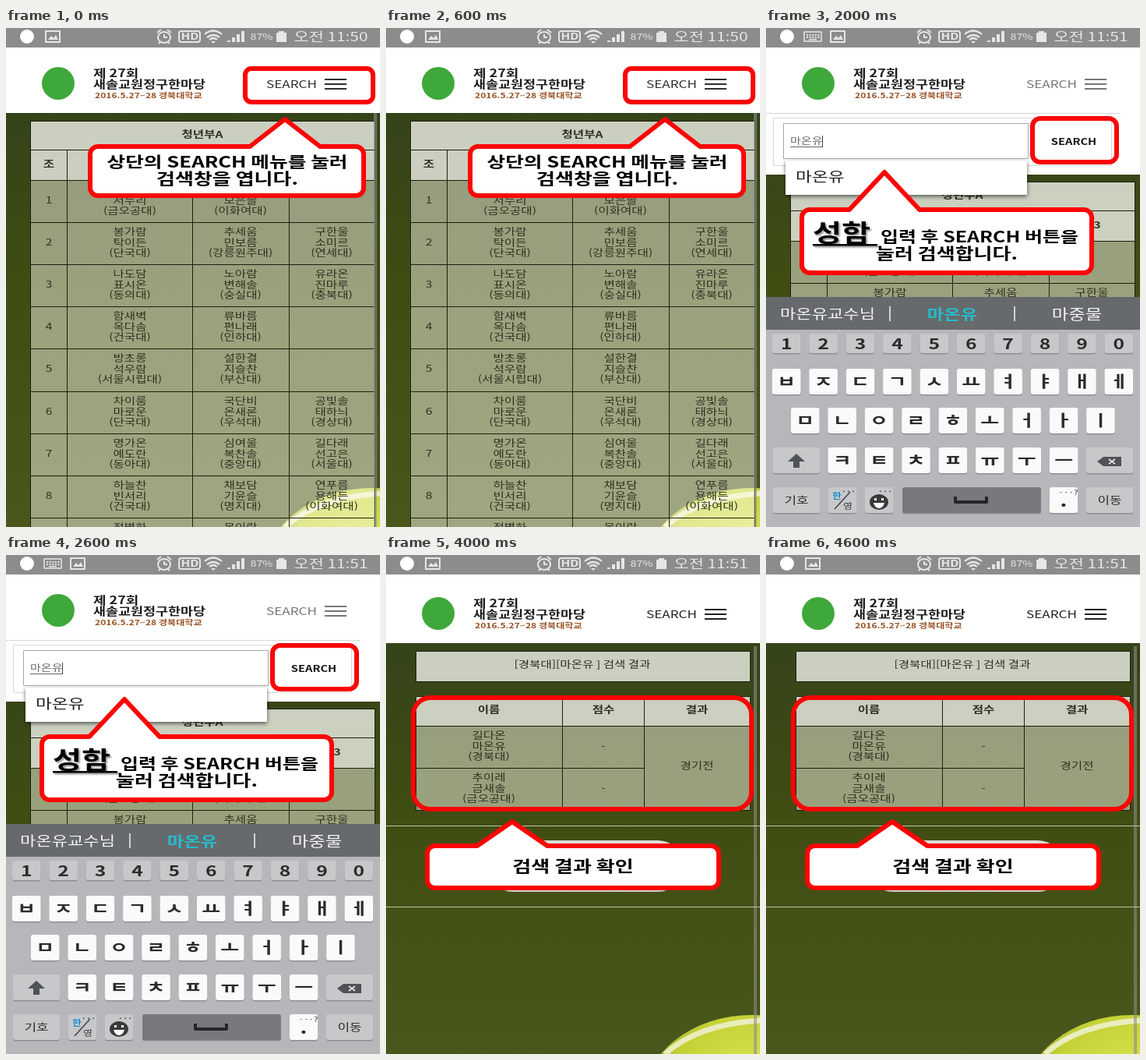
An HTML page with a canvas that plays this animation: 480 px wide and 640 px high, repeating every 5000 ms.

```html
<!DOCTYPE html>
<html lang="ko">
<head>
<meta charset="utf-8">
<style>
html, body { margin: 0; width: 100%; height: 100%; overflow: hidden; background: #3c4a14; }
canvas { display: block; }
</style>
</head>
<body>
<canvas id="stage" width="480" height="640"></canvas>
<script>
const c = document.getElementById('stage').getContext('2d');
const FONT = '"Noto Sans CJK KR", "Noto Sans CJK", "Noto Sans", sans-serif';
const WIDE = 1.3; // the phone screen is shown wider than it is
const RED = '#fa0505', INK = '#2d3020', PALE = '#e6e6e6';
const CELL = 'rgba(255,255,242,.47)', HEAD = 'rgba(255,255,250,.74)';
const PERSON = '마온유';

// Each row: two players and a school per team
const teams = [
  ['도하람 서누리 (금오공대)', '주다온 모은솔 (이화여대)'],
  ['봉가람 탁이든 (단국대)', '추세움 민보름 (강릉원주대)', '구한울 소미르 (연세대)'],
  ['나도담 표시온 (동의대)', '노아람 변해솔 (숭실대)', '유라온 진마루 (충북대)'],
  ['함새벽 옥다솜 (건국대)', '류바름 편나래 (인하대)'],
  ['방초롱 석우람 (서울시립대)', '설한결 지슬찬 (부산대)'],
  ['차이룸 마로운 (단국대)', '국단비 온새론 (우석대)', '공빛솔 태하늬 (경상대)'],
  ['명가온 예도란 (동아대)', '심여울 복찬솔 (중앙대)', '길다래 선고은 (서울대)'],
  ['하늘찬 빈서리 (건국대)', '채보담 기윤슬 (명지대)', '연푸름 용해든 (이화여대)'],
  ['전별하', '목이랑']
];

function text(s, x, y, size = 12, color = INK, weight = 400, align = 'center') {
  c.save();
  c.translate(x, y + size * .37);
  c.scale(WIDE, 1);
  c.font = `${weight} ${size}px ${FONT}`;
  c.fillStyle = color;
  c.textAlign = align;
  c.fillText(s, 0, 0);
  c.restore();
}
const left = (s, x, y, size, color, weight) => text(s, x, y, size, color, weight, 'left');
const bold = (s, x, y, size = 20) => text(s, x, y, size, '#000', 700);

function fill(x, y, w, h, color) {
  c.fillStyle = color;
  c.fillRect(x, y, w, h);
}

function round(x, y, w, h, r, { color, line, width = 6 }) {
  c.beginPath();
  c.roundRect(x, y, w, h, r);
  paint(color, line, width);
}

function paint(color, line, width) {
  if (color) { c.fillStyle = color; c.fill(); }
  if (line) { c.strokeStyle = line; c.lineWidth = width; c.lineJoin = 'round'; c.stroke(); }
}

function path(d, color, line, width = 2) {
  const p = new Path2D(d);
  if (color) { c.fillStyle = color; c.fill(p); }
  if (line) { c.strokeStyle = line; c.lineWidth = width; c.stroke(p); }
}

function callout(x, y, w, h, tipX, tipY) {
  const r = 10, right = x + w, bottom = y + h;
  c.beginPath();
  c.moveTo(tipX - 45, y);
  c.lineTo(tipX, tipY);
  c.lineTo(tipX + 45, y);
  c.arcTo(right, y, right, bottom, r);
  c.arcTo(right, bottom, x, bottom, r);
  c.arcTo(x, bottom, x, y, r);
  c.arcTo(x, y, right, y, r);
  c.closePath();
  paint('#fff', RED, 6);
}

function shadowWord(s, x, y, lineW) {
  c.save();
  c.shadowColor = '#999';
  c.shadowOffsetX = c.shadowOffsetY = 2;
  c.shadowBlur = 2;
  left(s, x, y, 31, '#000', 700);
  fill(x, y + 14, lineW, 2.5, '#000');
  c.restore();
}

function field(ball) {
  const g = c.createLinearGradient(0, 109, 0, 640);
  g.addColorStop(0, '#35431a');
  g.addColorStop(.4, '#3f4d13');
  g.addColorStop(1, '#49571c');
  fill(0, 0, 480, 640, g);
  if (!ball) return;
  const b = c.createRadialGradient(470, 690, 40, 470, 700, 140);
  b.addColorStop(0, '#d5e04a');
  b.addColorStop(.7, '#c4d136');
  b.addColorStop(1, '#a3b428');
  c.beginPath();
  c.ellipse(470, 700, 140, 110, 0, 0, 7);
  paint(b);
  path('M358 640Q400 602 480 597', null, '#e9edbd', 7);
}

// Borders sit on whole pixels so that they stay sharp
function cell(x, y, w, h, color) {
  fill(x, y, w, h, color);
  c.strokeStyle = '#1b200f';
  c.lineWidth = 1;
  c.strokeRect(x + .5, y + .5, w, h);
}

function lines(s, x, y) {
  s.split(' ').forEach((part, i) => text(part, x, y + 13.3 * i));
}

function teamTable(top) {
  const cols = [31, 78, 239, 363, 473], mids = [55, 159, 301, 418];
  cell(31, top, 442, 37, HEAD);
  text('청년부A', 252, top + 18, 12, INK, 700);
  ['조', '팀1', '팀2', '팀3'].forEach((s, i) => {
    cell(cols[i], top + 37, cols[i + 1] - cols[i], 39, HEAD);
    text(s, mids[i], top + 56, 12, INK, 700);
  });
  const rowTop = n => top + 76 + Math.round(54.1 * n);
  teams.forEach((row, n) => {
    const y = rowTop(n);
    for (let i = 0; i < 4; i++) {
      cell(cols[i], y, cols[i + 1] - cols[i], rowTop(n + 1) - y, CELL);
      if (!i) text(n + 1, mids[0], y + 26);
      else if (row[i - 1]) lines(row[i - 1], mids[i], y + 13);
    }
  });
}

function pictureIcon(x) {
  c.strokeStyle = PALE;
  c.lineWidth = 2;
  c.strokeRect(x - 9, 4, 18, 14);
  path(`M${x - 6} 15l4-5 3 3 3-4 3 6z`, PALE);
}

function statusBar(time, typing) {
  fill(0, 0, 480, 25, '#8c8c8c');
  if (!time) return;
  c.beginPath();
  c.arc(27, 11, 9, 0, 7);
  paint('#fff');
  pictureIcon(typing ? 92 : 60);
  if (typing) {
    c.strokeStyle = PALE;
    c.lineWidth = 1.5;
    c.strokeRect(49, 5, 22, 12);
    for (let i = 0; i < 10; i++) fill(52 + i % 5 * 3.6, 8 + (i > 4) * 3, 2, 2, PALE);
    fill(55, 14, 10, 1.5, PALE);
  }
  c.beginPath();
  c.ellipse(203, 12, 8, 7, 0, 0, 7);
  paint(null, PALE, 2);
  path('M203 8v4h4M194 6l5-4M212 6l-5-4M198 18l-2 2M208 18l2 2', null, PALE);
  round(222, 4, 27, 14, 3, { line: PALE, width: 2 });
  text('HD', 236, 11, 12, PALE, 700);
  path('M255 8q11-9 22 0M258 12q8-6 16 0M261 15q5-4 10 0', null, PALE, 2.2);
  path('M263 17h6l-3 3z', PALE);
  [2, 6, 10, 14].forEach((h, i) => fill(284 + i * 6, 18 - h, 4, h, PALE));
  text('87%', 328, 11, 11, PALE);
  fill(347, 6, 13, 12, PALE);
  fill(350, 4, 7, 2, PALE);
  text('오전 ' + time, 417, 11, 16, PALE);
}

function searchMenu(y, color) {
  left('SEARCH', 334, y, 13.2, color, 500);
  for (const dy of [-7, -1, 5]) fill(409, y + dy, 28, 2, color);
}

function header(bottom, dy, color) {
  fill(0, 25, 480, bottom - 25, '#fff');
  c.beginPath();
  c.arc(67, 71 + dy, 21, 0, 7);
  paint('#3fa83a');
  left('제 27회', 112, 58 + dy, 13.8, '#1c1c1c', 900);
  left('새솔교원정구한마당', 112, 72 + dy, 13.4, '#1c1c1c', 900);
  left('2016.5.27~28 경북대학교', 114, 87 + dy, 9.3, '#98501f', 700);
  searchMenu(72 + dy, color);
}

function scrollbar(top, bottom) {
  fill(472, top, 4, bottom - top, 'rgba(140,140,140,.6)');
}

function searchPanel() {
  fill(0, 109, 455, 1, '#d5d5d5');
  c.lineWidth = 1;
  c.strokeStyle = '#d8d8d8';
  c.strokeRect(9.5, 115.5, 434, 61);
  c.strokeStyle = '#a8a8a8';
  c.strokeRect(22.5, 122.5, 314, 45);
  text('SEARCH', 395, 146, 11.3, '#111', 700);
}

function key(x, y, w, color, label, size = 20, h = 33, weight = 700) {
  round(x, y + 1.5, w, h, 3, { color: '#8d9093' });
  round(x, y, w, h, 3, { color });
  if (label) text(label, x + w / 2, y + h / 2, size, '#2c2c2c', weight);
}

function keyboard() {
  const pitch = 47.4, grey = '#c6c8ca', dark = '#505355';
  fill(0, 345, 480, 42, '#666a6d');
  text(PERSON + '교수님', 79, 367, 17, '#f4f4f4', 500);
  text(PERSON, 239, 367, 18, '#25bccb', 700);
  text('마중물', 399, 367, 18, '#f4f4f4', 500);
  for (const x of [158, 318]) fill(x, 357, 2, 19, '#d0d0d0');
  fill(0, 387, 480, 253, '#b5b7ba');
  const row = (chars, x, y) =>
    [...chars].forEach((s, i) => key(x + pitch * i, y, 36.5, '#fafafa', s));
  [...'1234567890'].forEach((s, i) => key(8 + pitch * i, 392, 36.5, grey, s, 19, 25));
  row('ㅂㅈㄷㄱㅅㅛㅕㅑㅐㅔ', 8, 437);
  row('ㅁㄴㅇㄹㅎㅗㅓㅏㅣ', 32, 487);
  row('ㅋㅌㅊㅍㅠㅜㅡ', 79.5, 538);
  key(9, 538, 60, grey);
  path('M39 546l11 10h-7v8h-8v-8h-7z', dark);
  key(411, 538, 60, grey);
  path('M425 556l8-6h23v12h-23z', dark);
  path('M440 553l8 6m0-6l-8 6', null, '#ddd');
  key(9, 589, 60, grey, '기호', 13, 33, 500);
  key(80, 589, 36, grey);
  text('한', 91, 600, 10, '#168bd0', 700);
  text('영', 105, 613, 10, '#333', 500);
  path('M88 617l20-22', null, '#444', 1.5);
  key(127, 589, 36, grey);
  c.beginPath();
  c.ellipse(145, 608, 12, 10, 0, 0, 7);
  paint('#3a3a3a');
  path('M138 609h14q-2 7-7 7t-7-7z', '#fff');
  fill(139, 603, 3, 3, '#fff');
  fill(148, 603, 3, 3, '#fff');
  for (const x of [106, 153]) text('···', x, 594, 8, '#333', 700);
  key(175, 589, 178, '#77797c');
  path('M243 601v7h40v-7', null, '#262626', 4);
  key(364, 589, 36, '#fafafa', '.', 22);
  text('···?', 388, 596, 9, '#333');
  key(411, 589, 60, grey, '이동', 13, 33, 500);
}

function resultBackdrop(dy) {
  for (const y of [220, 324]) fill(0, y + dy, 480, 1, '#bcc4ab');
  const g = c.createLinearGradient(0, 239 + dy, 0, 305 + dy);
  g.addColorStop(0, '#d9d9d9');
  g.addColorStop(.3, '#f0f0f0');
  g.addColorStop(1, '#cfcfcf');
  round(130, 239 + dy, 252, 66, 33, { color: g });
}

const scenes = [
  () => {
    field(true);
    teamTable(119);
    statusBar('11:50');
    header(109, 0, '#2f2f2f');
    scrollbar(109, 640);
    round(307, 52, 164, 43, 8, { color: '#fff', line: RED });
    searchMenu(72, '#2f2f2f');
    callout(108, 152, 351, 63, 358, 117);
    bold('상단의 SEARCH 메뉴를 눌러', 284, 172, 19.8);
    bold('검색창을 엽니다.', 284, 194);
  },
  () => {
    field();
    teamTable(197);
    statusBar();
    pictureIcon(24);
    left('스크린샷 저장 중...', 46, 11, 14.2, PALE);
    header(188, 0, '#777');
    searchPanel();
    scrollbar(28, 405);
    round(16, 119, 329, 51, 8, { line: RED });
    callout(46, 233, 353, 62, 148, 196);
    bold('검색창에 검색하고자 하시는', 222, 246);
    left('분의', 78, 279, 20, '#000', 700);
    shadowWord('성함', 132, 275, 74);
    left('을 입력합니다.', 208, 279, 20, '#000', 700);
  },
  () => {
    field();
    teamTable(197);
    statusBar('11:51', true);
    header(188, 0, '#777');
    searchPanel();
    left(PERSON, 31, 145, 11.6, '#666');
    fill(31, 152, 41, 1, '#666');
    fill(72, 138, 1, 15, '#444');
    c.save();
    c.shadowColor = 'rgba(0,0,0,.6)';
    c.shadowBlur = 5;
    c.shadowOffsetY = 2;
    fill(25, 170, 310, 44, '#fff');
    c.restore();
    left(PERSON, 38, 191, 17.5, '#222', 500);
    round(342, 116, 108, 56, 10, { line: RED });
    callout(46, 233, 372, 81, 152, 185);
    shadowWord('성함', 60, 263, 83);
    left('입력 후 SEARCH 버튼을', 147, 268, 19.2, '#000', 700);
    bold('눌러 검색합니다.', 232, 290);
    keyboard();
  },
  () => {
    field(true);
    statusBar();
    header(113, 4, '#222');
    scrollbar(117, 640);
    resultBackdrop(0);
    cell(38, 123, 429, 37, HEAD);
    text(`[${PERSON} ] 검색 결과`, 252, 141);
    cell(38, 160, 213, 40, CELL);
    cell(251, 160, 216, 40, CELL);
    text(PERSON, 144, 179);
    text('경북대', 359, 179);
    round(36, 161, 428, 40, 8, { line: RED });
    callout(45, 263, 371, 78, 151, 215);
    bold('성함과 학교를 확인 한 후 해당', 230, 291, 20.3);
    bold('하는 검색 결과를 클릭합니다.', 230, 313);
    round(43, 360, 374, 26, 4, { color: '#fff', line: RED, width: 5 });
    bold('*동명이인의 경우 학교를 이용하여 구분', 230, 373, 16);
  },
  () => {
    field(true);
    statusBar('11:51');
    header(113, 4, '#222');
    scrollbar(117, 640);
    resultBackdrop(127);
    cell(38, 123, 429, 39, HEAD);
    text(`[경북대][${PERSON} ] 검색 결과`, 252, 141);
    const cols = [38, 226, 331, 467];
    ['이름', '점수', '결과'].forEach((s, i) => {
      cell(cols[i], 181, cols[i + 1] - cols[i], 38, HEAD);
      text(s, [132, 279, 399][i], 199, 12, INK, 700);
    });
    [`길다온 ${PERSON} (경북대)`, '추이레 금새솔 (금오공대)'].forEach((s, i) => {
      const y = 219 + 54 * i;
      cell(38, y, 188, 54, CELL);
      cell(226, y, 105, 54, CELL);
      lines(s, 132, y + 13);
      text('-', 279, y + 26);
    });
    cell(331, 219, 136, 108, CELL);
    text('경기전', 399, 271);
    round(35, 183, 434, 143, 22, { line: RED });
    callout(53, 373, 374, 54, 162, 342);
    bold('검색 결과 확인', 240, 400);
  }
];

let shown = -1;
function tick() {
  const now = Math.floor(performance.now() % 5000 / 1000);
  if (now !== shown) scenes[shown = now]();
  requestAnimationFrame(tick);
}
tick();
</script>
</body>
</html>
```
